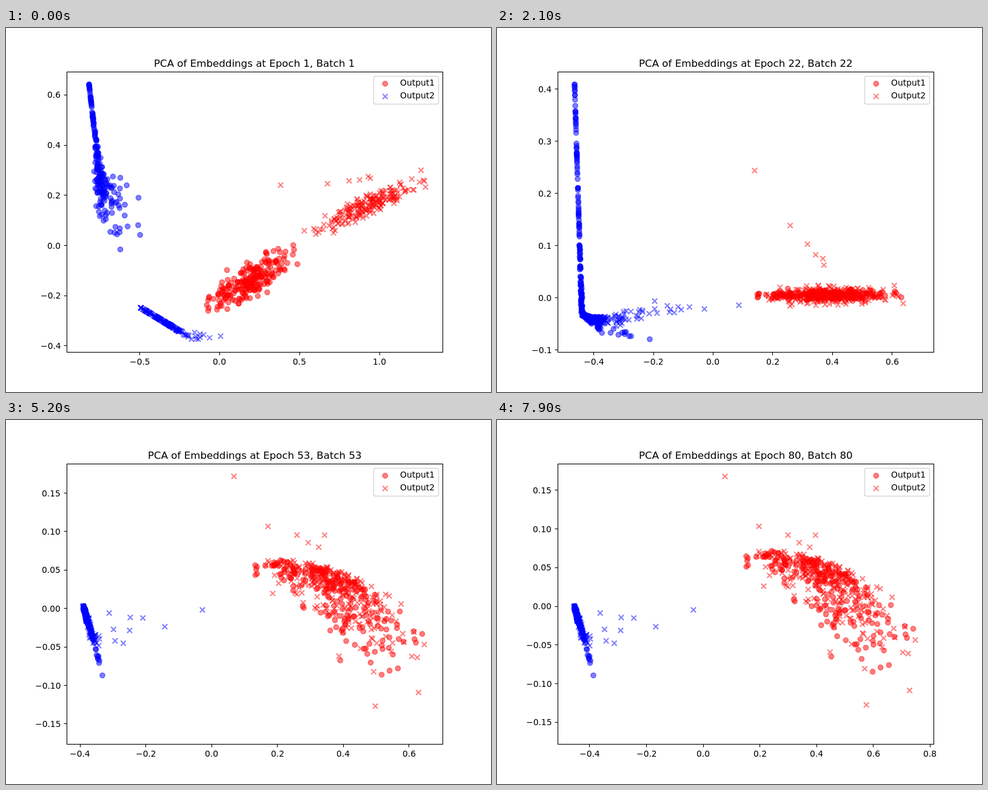
Recreate the animation shown at these times as an HTML page with a canvas. Size 800 by 600 pixels, loop 8000 ms.

```html
<!DOCTYPE html>
<html lang="en">
<head>
<meta charset="utf-8">
<title>PCA of Embeddings</title>
<style>
  html, body { margin: 0; width: 100%; height: 100%; overflow: hidden; background: #fff; }
  canvas { display: block; }
</style>
</head>
<body>
<canvas id="stage" width="800" height="600"></canvas>
<script>
const ctx = document.getElementById('stage').getContext('2d');
const EPOCHS = 80, STEP_MS = 100;
const LEFT = 100, TOP = 72, RIGHT = 720, BOTTOM = 534;
const COLORS = { r: '#f00', b: '#00f' };

// Poses are given at these epochs; a shorter list of poses holds its last one.
const KEYS = [1, 14, 22, 33, 46, 61, 80];

// The second component changes sign within this range of epochs.
const FLIP_FROM = 29, FLIP_TO = 40, MIRROR = 606;

// Pixel of zero and pixels per unit, for x and y
const AXES = [
  [352.3, 263.8, 358.5, 413.5],
  [386.5, 394.5, 419.5, 656],
  [356.5, 492, 444.6, 859.5],
  [340, 562, 293.3, 1031],
  [339, 562, 314, 1252],
  [339.5, 520.5, 307, 1285],
  [340, 467.8, 307, 1274]
];

// Blue points follow a bent line: four corners, then the scatter in x and y.
const CORNERS = [0, .7, .93, 1];
const DOT_LINES = [
  [137, 93, 158, 270, 180, 300, 218, 325, 14, 34],
  [128, 93, 161, 400, 190, 462, 262, 467, 8, 14],
  [128, 93, 140, 470, 172, 497, 252, 513, 2, 3],
  [128, 270, 137, 318, 157, 382, 245, 513, 2, 4],
  [128, 307, 130, 313, 145, 366, 159, 421, 1, 1]
];
const CROSS_LINES = [
  [222, 461, 272, 491, 290, 502, 306, 513, 1, 1],
  [194, 503, 262, 511, 345, 508, 370, 504, 6, 4],
  [141, 473, 172, 481, 230, 478, 264, 470, 8, 9],
  [128, 274, 134, 304, 145, 316, 155, 300, 3, 8],
  [127, 307, 134, 330, 145, 362, 153, 372, 3, 5]
];

// Stray crosses trail from a far tip back to their cluster.
const BLUE_TIPS = [[354, 508], [492, 470], [399, 457], [346, 273], [324, 313]];
const RED_TIPS = [[453, 259], [406, 292], [425, 235], [385, 93], [376, 93]];
const RED_ROOTS = [[640, 245], [600, 375], [570, 430], [554, 221], [560, 240]];

const mix = (a, b, f) => a + (b - a) * f;
const clamp = (v, low, high) => Math.min(high, Math.max(low, v));

let seed = 7;
function rand() {
  seed = seed + 0x6D2B79F5 | 0;
  let v = Math.imul(seed ^ seed >>> 15, 1 | seed);
  v = v + Math.imul(v ^ v >>> 7, 61 | v) ^ v;
  return ((v ^ v >>> 14) >>> 0) / 4294967296;
}
const gauss = () => (rand() + rand() + rand() + rand() - 2) * 1.73;

const dots = [], crosses = [];

function addPoint(group, color, poses) {
  group.push({ color, poses: poses.map(([x, y]) => [clamp(x, 127.5, 692), clamp(y, 93, 513)]) });
}

// Place at s on a bent line, denser towards the first bend
function along(line, s) {
  const j = Math.max(1, CORNERS.findIndex(c => c >= s));
  let f = (s - CORNERS[j - 1]) / (CORNERS[j] - CORNERS[j - 1]);
  if (j === 1) f = 1 - (1 - f) ** 1.5;
  return [0, 1].map(d => mix(line[2 * j - 2 + d], line[2 * j + d], f));
}

function addLine(group, lines, count) {
  for (let i = 0; i < count; i++) {
    const isEnd = i < 2;
    const s = isEnd ? i : rand() * .98;
    const g = isEnd ? 0 : gauss() * s * s, h = isEnd ? 0 : gauss() * s * s;
    addPoint(group, 'b', lines.map(line => {
      const [x, y] = along(line, s);
      return [x + line[8] * g, y + line[9] * h];
    }));
  }
}

function addStrays(color, roots, tips, count) {
  for (let i = 0; i < count; i++) {
    const pull = 1 / (1 + .8 * i), g = gauss() * (1 - pull), h = gauss() * (1 - pull);
    addPoint(crosses, color, tips.map((tip, k) => {
      const spread = k < 3 ? 5 : 22;
      return [mix(roots[k][0], tip[0], pull) + spread * g, mix(roots[k][1], tip[1], pull) + spread * h];
    }));
  }
}

// A red cloud that widens and sinks to the right once settled
function addCloud(group, count, widening, first, flatness) {
  for (let i = 0; i < count; i++) {
    const a = clamp(gauss(), -2.38, 2.5), b = gauss(), g = gauss();
    const x = 545 + 58 * a, d = (x - 407) / 285;
    const y = 240 + 150 * d ** 1.8 + (10 + widening * d) * (g + .25 * g * g - .25);
    const stretched = f => 510 - (510 - y) * f;
    addPoint(group, 'r', [
      first(a, b),
      [560 + 50 * a, 405 - 19 * a + 9 * b],
      [545 + 50 * a, 441 + flatness * b],
      [385 + (x - 376) * .92, 12 + .87 * y],
      [x, stretched(.975)],
      [x, y],
      [x, stretched(1.04)]
    ]);
  }
}

addLine(dots, DOT_LINES, 205);
addCloud(dots, 225, 30, (a, b) => [405 + 31 * a, 418 - 16 * a + 14 * b], 4);
addLine(crosses, CROSS_LINES, 195);
addStrays('b', CROSS_LINES.map(line => line.slice(6, 8)), BLUE_TIPS, 9);
addCloud(crosses, 200, 40, (a, b) => [592 + 42 * a, 295 - 19 * a + 9 * b], 8);
addStrays('r', RED_ROOTS, RED_TIPS, 6);

function drawDot(x, y, color) {
  ctx.fillStyle = ctx.strokeStyle = COLORS[color];
  ctx.lineWidth = 1.39;
  ctx.beginPath();
  ctx.arc(x, y, 4.17, 0, 2 * Math.PI);
  ctx.fill();
  ctx.stroke();
}

function drawCross(x, y, color) {
  const r = 4.17;
  ctx.strokeStyle = COLORS[color];
  ctx.lineWidth = 2.08;
  ctx.beginPath();
  ctx.moveTo(x - r, y - r);
  ctx.lineTo(x + r, y + r);
  ctx.moveTo(x - r, y + r);
  ctx.lineTo(x + r, y - r);
  ctx.stroke();
}

// Text on whole pixels; align is the share of the width left of x
function text(str, x, y, align, size = 13.89) {
  ctx.font = `${size}px "DejaVu Sans", sans-serif`;
  ctx.fillStyle = '#000';
  ctx.fillText(str, Math.round(x - align * ctx.measureText(str).width), Math.round(y));
}

function ticks(from, to, draw) {
  const step = [.05, .1, .2, .25, .5].find(s => (to - from) / s <= 9) || 1;
  const digits = step === .05 || step === .25 ? 2 : 1;
  for (let k = Math.ceil(from / step); k * step <= to; k++) {
    draw(k * step, (k < 0 ? '−' : '') + Math.abs(k * step).toFixed(digits));
  }
}

function line(x1, y1, x2, y2) {
  ctx.beginPath();
  ctx.moveTo(x1, y1);
  ctx.lineTo(x2, y2);
  ctx.stroke();
}

function drawAxes([x0, sx, y0, sy]) {
  ctx.strokeStyle = '#000';
  ctx.lineWidth = 1.11;
  ctx.strokeRect(LEFT + .5, TOP + .5, RIGHT - LEFT, BOTTOM - TOP);
  ticks((LEFT - x0) / sx, (RIGHT - x0) / sx, (v, label) => {
    const x = x0 + v * sx, px = Math.floor(x) + .5;
    line(px, BOTTOM + .5, px, BOTTOM + 5.4);
    text(label, x, 555, .5);
  });
  ticks((y0 - BOTTOM) / sy, (y0 - TOP) / sy, (v, label) => {
    const y = y0 - v * sy, py = Math.floor(y) + .5;
    line(LEFT + .5, py, LEFT - 4.4, py);
    text(label, 90.3, y + 5.1, 1);
  });
}

function drawLegend(epoch) {
  // Each entry takes the colour of the first point in a shuffled batch.
  const first = 5 * epoch % 11 > 5 ? 'b' : 'r';
  const second = 9 * epoch % 11 > 7 ? 'b' : 'r';
  ctx.globalAlpha = .8;
  ctx.fillStyle = '#fff';
  ctx.strokeStyle = '#ccc';
  ctx.lineWidth = 1.39;
  ctx.beginPath();
  ctx.roundRect(606.5, 79.5, 107, 46, 2.8);
  ctx.fill();
  ctx.stroke();
  ctx.globalAlpha = .5;
  drawDot(625.4, 91.8, first);
  drawCross(625.4, 112.8, second);
  ctx.globalAlpha = 1;
  text('Output1', 650.4, 95, 0);
  text('Output2', 650.4, 116, 0);
}

function draw(epoch) {
  const flipped = epoch >= FLIP_FROM && epoch < FLIP_TO;
  const k = clamp(KEYS.findIndex(key => key > epoch), 0, KEYS.length) - 1;
  const from = k < 0 ? KEYS.length - 2 : k;
  const f = (epoch - KEYS[from]) / (KEYS[from + 1] - KEYS[from]);
  const pose = poses => {
    const at = i => poses[Math.min(i, poses.length - 1)];
    return at(from).map((v, d) => mix(v, at(from + 1)[d], f));
  };
  const plot = (group, mark) => group.forEach(({ color, poses }) => {
    const [x, y] = pose(poses);
    mark(x, flipped ? MIRROR - y : y, color);
  });
  ctx.globalAlpha = 1;
  ctx.fillStyle = '#fff';
  ctx.fillRect(0, 0, 800, 600);
  ctx.globalAlpha = .5;
  plot(dots, drawDot);
  plot(crosses, drawCross);
  ctx.globalAlpha = 1;
  const [x0, sx, y0, sy] = pose(AXES);
  drawAxes([x0, sx, flipped ? MIRROR - y0 : y0, sy]);
  text(`PCA of Embeddings at Epoch ${epoch}, Batch ${epoch}`, 410, 64, .5, 16.67);
  drawLegend(epoch);
}

const start = performance.now();
let shown = 0;
function tick() {
  const epoch = Math.floor((performance.now() - start) / STEP_MS) % EPOCHS + 1;
  if (epoch !== shown) draw(shown = epoch);
  requestAnimationFrame(tick);
}
tick();
</script>
</body>
</html>
```
